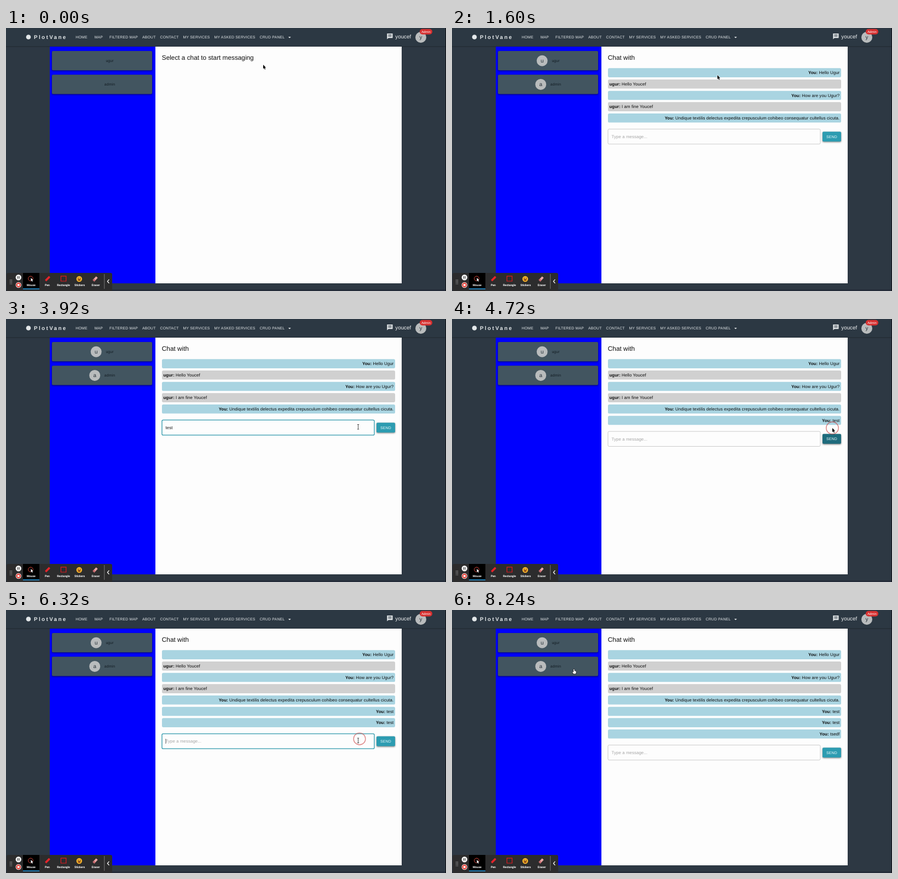
Write an HTML page with a canvas that moves like this. It is 804 px wide and 480 px high and loops after 8.28 s.

```html
<!DOCTYPE html>
<html lang="en">
<head>
<meta charset="utf-8">
<title>Chat demo</title>
<style>
html, body { margin: 0; width: 804px; height: 480px; overflow: hidden; background: #2d3843; }
canvas { display: block; }
</style>
</head>
<body>
<canvas id="stage" width="804" height="480"></canvas>
<script>
const ctx = document.getElementById('stage').getContext('2d');
ctx.textRendering = 'geometricPrecision';

const LOOP = 8280, OPEN_AT = 640;
const TRAVEL = 300, KEY_MS = 65, RING_MS = 450, FADE = 250;
const SANS = '"Liberation Sans", Arial, sans-serif';
const BODY = { size: 7.86, track: 0.074 };
const BOLD = { ...BODY, weight: 'bold' };
const CAPS = { size: 6.9, track: 0.2 };

const guest = 'ugur', owner = 'youcef';
const talk = [
  ['You:', 'Hello Ugur'],
  [guest + ':', 'Hello Youcef'],
  ['You:', 'How are you Ugur?'],
  [guest + ':', 'I am fine Youcef'],
  ['You:', 'Undique textilis delectus expedita crepusculum cohibeo consequatur cultellus cicuta.']
];

const rowTop = i => 73.3 + 20.67 * i;
const composerTop = rows => rowTop(rows) + 7.8;

// Each draft: click the field, type, click the button; the row appears shortly after.
const drafts = [
  { text: 'test', focus: 2960, type: 3600, click: 4390 },
  { text: 'test', focus: 5120, type: 5280, click: 5720 },
  { text: 'tsedf', focus: 6250, type: 6600, click: 7000 }
];
const AFTER = 7480;
const stops = [[0, 470, 67], [420, 168, 64], [1500, 485, 86], [2300, 740, 150],
  [2520, 672, 149], [2680, 664, 153]];
const clicks = [[460, 168, 64], [2520, 672, 149]];
drafts.forEach((d, i) => {
  const top = composerTop(talk.length + i);
  const next = drafts[i + 1];
  d.sent = d.click + 100;
  d.leave = (next ? next.focus : AFTER) - TRAVEL;
  const fx = 646, fy = top + 9.4, bx = 695, by = top + 14.5;
  stops.push([d.focus, fx, fy], [d.focus + 70, fx - 2.5, fy + 3], [d.click - 40, bx, by]);
  clicks.push([d.focus, fx, fy], [d.click, bx, by]);
});
stops.push([AFTER, 566, 159], [8200, 223, 108]);

const clamp = v => Math.max(0, Math.min(1, v));
const smooth = u => u * u * (3 - 2 * u);

function box(x, y, w, h, r, fill) {
  ctx.beginPath();
  ctx.roundRect(x, y, w, h, r);
  ctx.fillStyle = fill;
  ctx.fill();
}

function outline(x, y, w, h, r, color, width) {
  ctx.beginPath();
  ctx.roundRect(x, y, w, h, r);
  ctx.strokeStyle = color;
  ctx.lineWidth = width;
  ctx.stroke();
}

function disc(x, y, r, fill) {
  ctx.beginPath();
  ctx.arc(x, y, r, 0, 7);
  ctx.fillStyle = fill;
  ctx.fill();
}

function circle(x, y, r, color, width) {
  ctx.beginPath();
  ctx.arc(x, y, r, 0, 7);
  ctx.strokeStyle = color;
  ctx.lineWidth = width;
  ctx.stroke();
}

function shape(d, x, y, fill, edge, scale = 1) {
  const p = new Path2D(d);
  ctx.save();
  ctx.translate(x, y);
  ctx.scale(scale, scale);
  ctx.lineJoin = 'round';
  ctx.lineWidth = 1.2;
  ctx.strokeStyle = edge;
  ctx.fillStyle = fill;
  if (edge) ctx.stroke(p);
  ctx.fill(p);
  ctx.restore();
}

function line(x0, y0, x1, y1, color, width) {
  ctx.beginPath();
  ctx.moveTo(x0, y0);
  ctx.lineTo(x1, y1);
  ctx.strokeStyle = color;
  ctx.lineWidth = width;
  ctx.stroke();
}

function raised(x, y, w, h, fill) {
  ctx.save();
  ctx.shadowColor = 'rgba(0,0,0,.5)';
  ctx.shadowBlur = 3;
  ctx.shadowOffsetY = 1.2;
  box(x, y, w, h, 2, fill);
  ctx.restore();
}

function setFont({ size, weight = '', family = SANS, track = 0 }) {
  ctx.font = `${weight} ${size}px ${family}`;
  ctx.letterSpacing = track + 'px';
}

function width(str, font) {
  setFont(font);
  return ctx.measureText(str).width;
}

function text(str, x, y, color, font, align = 'left') {
  setFont(font);
  ctx.textAlign = align;
  ctx.fillStyle = color;
  ctx.fillText(str, x, y);
}

function avatar(x, y, letter) {
  disc(x, y, 10, '#b9bcbd');
  text(letter, x, y + 3.3, '#263038', { size: 9.8 }, 'center');
}

function header() {
  box(0, 0, 804, 34, 0, '#2c3843');
  box(0, 33, 804, 2, 0, 'rgba(0,0,0,.16)');
  const ink = '#e3e7e9';
  disc(41, 16.5, 4.3, ink);
  text('PlotVane', 51, 20.3, ink, { size: 9.82, weight: 'bold', track: 2.4 });

  let x = 122.3;
  const nav = ['HOME', 'MAP', 'FILTERED MAP', 'ABOUT', 'CONTACT', 'MY SERVICES',
    'MY ASKED SERVICES', 'CRUD PANEL'];
  for (const label of nav) {
    const w = width(label, CAPS);
    const cell = Math.max(31.4, w + 7.86);
    text(label, x + (cell - w) / 2, 19.3, ink, CAPS);
    x += cell;
  }
  shape('M0 0h4.8l-2.4 2.4z', 515.8, 16, ink);

  shape('M0 0h10.2v8.2h-7.6l-2.6 2.4z', 696.3, 10, ink);
  for (let i = 0; i < 3; i++) line(698.3, 12 + i * 1.7, 704.5, 12 + i * 1.7, '#2c3843', 0.8);

  text(owner, 711.3, 18.6, '#eef0f1', { size: 9.82 });
  avatar(758, 17, owner[0]);
  box(756, 1.8, 23, 10, 5, '#d63030');
  text('Admin', 767.5, 9, '#fff', { size: 5.9 }, 'center');
}

function sidebar(open) {
  box(80, 34, 193, 432, 0, '#0000fe');
  [guest, 'admin'].forEach((name, i) => {
    const y = 42 + i * 43.2;
    const font = { size: 6.9, track: 0.1 };
    raised(84, y, 183, 35.3, '#425560');
    if (open) avatar(174.5 - width(name, font) / 2 - 2.7, y + 17.7, name[0]);
    text(name, 189.5, y + 19.6, '#131c23', font, 'center');
  });
}

function textSpan([who, words]) {
  const head = width(who + ' ', BOLD);
  const total = head + width(words, BODY);
  const x = who === 'You:' ? 708.3 - total : 287.4;
  return { x, head, end: x + total };
}

function row(msg, i) {
  const y = rowTop(i);
  const span = textSpan(msg);
  box(285, y, 426, 16.6, 2.6, msg[0] === 'You:' ? '#a9d4e1' : '#d0d0d0');
  text(msg[0], span.x, y + 11, '#0b0b0b', BOLD);
  text(msg[1], span.x + span.head, y + 11, '#0b0b0b', BODY);
}

function hoverLevel(t) {
  return Math.max(...drafts.map(d =>
    clamp((t - d.click + 150) / FADE) * (1 - clamp((t - d.leave) / FADE))));
}

function composer(t, top) {
  const active = drafts.find(d => t >= d.focus && t < d.click);
  if (active) outline(285, top, 388, 27.4, 2.2, '#2d98ab', 1.3);
  else outline(285, top, 388, 27.4, 2.2, '#c6c6c6', 0.9);

  const draft = drafts.find(d => t >= d.type && t < d.sent);
  const typed = draft ? draft.text.slice(0, 1 + Math.floor((t - draft.type) / KEY_MS)) : '';
  text(typed || 'Type a message...', 291.6, top + 16.5, typed ? '#151515' : '#a5a5a5', BODY);
  if (active && (t - active.focus) % 1000 < 500) {
    const x = 291.9 + width(typed, BODY);
    line(x, top + 9.2, x, top + 18.2, '#222', 0.7);
  }

  const k = hoverLevel(t);
  const mix = (a, b) => Math.round(a + (b - a) * k);
  raised(677, top + 4.7, 34, 18, `rgb(${mix(45, 31)},${mix(156, 107)},${mix(177, 124)})`);
  text('SEND', 694, top + 16.1, '#eefafc', CAPS, 'center');
}

function tilted(x, y, w, h, angle, fill) {
  ctx.save();
  ctx.translate(x, y);
  ctx.rotate(angle);
  box(-w / 2, -h / 2, w, h, 0.8, fill);
  ctx.restore();
}

function toolbar() {
  box(1, 447, 193, 34, 3, '#2c2c2d');
  box(31, 447, 30, 30, 0, '#000');
  box(31, 475.3, 30, 1.7, 0, '#2491d0');
  for (let i = 0; i < 8; i++) {
    box(7.2 + (i % 2) * 2.6, 459.2 + (i >> 1) * 2.4, 1.1, 1.1, 0, '#c9c9c9');
  }
  disc(22.8, 455.3, 5.2, '#f2f2f2');
  line(21.5, 453, 21.5, 457.6, '#333', 1.1);
  line(24.1, 453, 24.1, 457.6, '#333', 1.1);
  disc(22.8, 469, 5.2, '#f0dcda');
  disc(22.8, 469, 4.2, '#e13a32');
  box(20.9, 467.1, 3.8, 3.8, 0.5, '#fff');

  const label = { size: 5.2, weight: 'bold', family: 'Roboto, sans-serif' };
  ['Mouse', 'Pen', 'Rectangle', 'Stickers', 'Eraser'].forEach((name, i) =>
    text(name, 46 + i * 29.5, 470.5, '#fff', label, 'center'));

  circle(45, 457.3, 4.3, '#d8483f', 1);
  arrow(45.5, 456, '#fff', '#000', 0.8);
  tilted(76, 457.5, 10.5, 3.6, -Math.PI / 4, '#e3242b');
  outline(100.4, 452.8, 9.4, 9.2, 0, '#e01b22', 1.2);

  disc(133.8, 458, 5.2, '#f6b62c');
  for (const dx of [-1.8, 1.8]) disc(133.8 + dx, 456.6, 0.9, '#4a2c10');
  shape('M0 0h5.4a2.7 2.7 0 0 1-5.4 0z', 131.1, 458.6, '#7a3216');

  tilted(163, 458, 9.4, 4.2, -0.82, '#e9a5a5');
  tilted(161, 460.1, 3.4, 4.2, -0.82, '#c9686e');

  line(179.7, 449, 179.7, 476, '#8a8a8a', 0.8);
  line(188.4, 458.9, 185.2, 462.6, '#fff', 1.3);
  line(185.2, 462.2, 188.4, 465.9, '#fff', 1.3);
}

function arrow(x, y, fill, edge, scale) {
  shape('M0 0v7.6l1.7-1.5 1.2 2.6 1.2-.5-1.2-2.6 2.2-.2z', x, y, fill, edge, scale);
}

function beam(x, y) {
  for (const [color, w] of [['rgba(255,255,255,.7)', 1.8], ['#222', 0.8]]) {
    line(x, y - 4, x, y + 4, color, w);
    for (const dy of [-4.3, 4.3]) line(x - 1.7, y + dy, x + 1.7, y + dy, color, w);
  }
}

function hand(x, y) {
  shape('M-.9 0h1.4l.2 3 2.9.8.2 2.2-.9 2.6h-3.9l-1.8-3 .4-1 1.5 1z', x, y, '#fff', '#111');
}

// The pointer rests at each stop and sets off just in time for the next one.
function pointer(t) {
  const last = stops.length - 1;
  const i = stops.findIndex(s => s[0] > t);
  if (i < 0) return stops[last].slice(1);
  const [t0, x0, y0] = stops[i - 1];
  const [t1, x1, y1] = stops[i];
  const e = smooth(clamp(1 - (t1 - t) / Math.min(TRAVEL, t1 - t0)));
  return [x0 + (x1 - x0) * e, y0 + (y1 - y0) * e];
}

function rings(t) {
  for (const [start, x, y] of clicks) {
    const age = (t - start) / RING_MS;
    if (age < 0 || age > 1) continue;
    const r = age < 1 / 3 ? 16 * Math.sin(Math.PI * 1.5 * age) : 20 - 12 * age;
    circle(x, y, r, `rgba(200,50,50,${0.85 * r / 16})`, 1.4);
  }
}

function cursor(t, open, rows, top) {
  const [x, y] = pointer(t);
  const over = (l, u, r, b) => x >= l && x <= r && y >= u && y <= b;
  const onCard = over(84, 42, 267, 77) || over(84, 85, 267, 121);
  const onButton = open && over(677, top + 4.7, 711, top + 22.7);
  const onInput = open && over(285, top, 673, top + 27.4);
  const onText = open && rows.some((m, i) => {
    const span = textSpan(m);
    return over(span.x, rowTop(i) + 2, span.end, rowTop(i) + 14.6);
  });
  if (onCard || onButton) hand(x, y);
  else if (onInput || onText) beam(x, y);
  else arrow(x, y, '#000', 'rgba(255,255,255,.85)');
}

function draw(t) {
  const open = t >= OPEN_AT;
  const rows = talk.concat(drafts.filter(d => t >= d.sent).map(d => ['You:', d.text]));
  const top = composerTop(rows.length);

  box(0, 0, 804, 480, 0, '#2d3843');
  header();
  sidebar(open);
  box(273, 34, 450, 432, 0, '#fdfdfd');
  text(open ? 'Chat with' : 'Select a chat to start messaging', 284.8, 57.7, '#0c0c0c', { size: 11.8 });
  if (open) {
    rows.forEach(row);
    composer(t, top);
  }
  box(0, 477, 804, 3, 0, '#252d3a');
  box(803, 0, 1, 480, 0, '#0a0d10');
  toolbar();
  rings(t);
  cursor(t, open, rows, top);
}

const began = performance.now();
function tick() {
  draw((performance.now() - began) % LOOP);
  requestAnimationFrame(tick);
}
tick();
</script>
</body>
</html>
```
